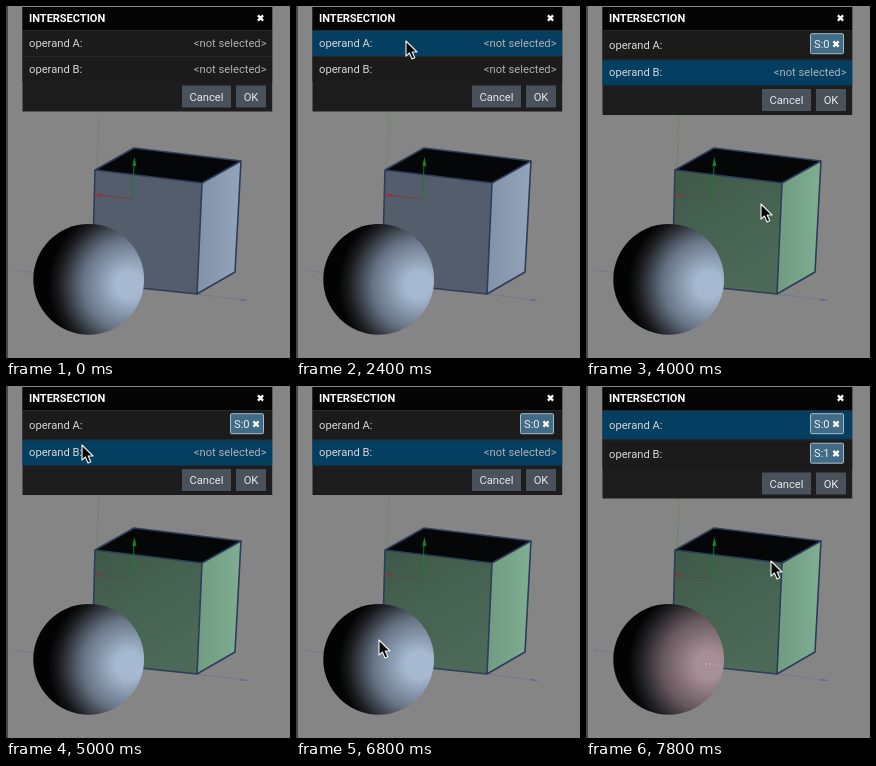
Write an HTML page that moves like this. It is 284 px wide and 352 px high and loops after 8000 ms.

```html
<!DOCTYPE html>
<html lang="en">
<head>
<meta charset="utf-8">
<title>Intersection</title>
<style>
html, body { margin: 0; width: 100%; height: 100%; overflow: hidden; background: #858585; }
svg { display: block; width: 100vw; height: 100vh; }
text { font: 11.2px Roboto, sans-serif; fill: #d6d6d6; }
.title { font-weight: 700; font-size: 11px; fill: #fff; }
.empty { fill: #aeb1b3; text-anchor: end; }
.button rect { fill: #49525b; }
.button text { fill: #e6e8ea; text-anchor: middle; }
.chip rect { fill: #426b86; stroke: #a9bac5; }
.chip text { fill: #e8eef2; }
.row { fill: #1b1b1b; }
.row.active { fill: #043f61; }
.edge { fill: none; stroke: #2d3c5a; stroke-width: 1.6; stroke-linejoin: round; }
</style>
</head>
<body>
<svg viewBox="0 0 284 352">
  <defs>
    <linearGradient id="side" x1="0" y1="0" x2="1" y2="0">
      <stop offset="0" stop-color="#8191a6"/><stop offset="1" stop-color="#93a5bc"/>
    </linearGradient>
    <linearGradient id="sideGreen" x1="0" y1="0" x2="1" y2="0">
      <stop offset="0" stop-color="#709b80"/><stop offset="1" stop-color="#7fae92"/>
    </linearGradient>
    <linearGradient id="frontGreen" x1="0" y1="0" x2=".5" y2="1">
      <stop offset="0" stop-color="#3f5949"/><stop offset="1" stop-color="#4c6a57"/>
    </linearGradient>
    <radialGradient id="ball" gradientUnits="userSpaceOnUse" cx="123" cy="279" r="96">
      <stop class="lit" offset="0"/><stop class="lit" offset=".14"/>
      <stop class="mid" offset=".48"/>
      <stop offset=".73" stop-color="#1b1c1f"/><stop offset=".84" stop-color="#030304"/>
    </radialGradient>
    <path id="cross" d="M-2.6-2.6 2.6 2.6M2.6-2.6-2.6 2.6" stroke="#fff" stroke-width="2.2"/>
  </defs>

  <rect width="284" height="352" fill="#858585"/>
  <path d="M1 0V352" stroke="#383838" stroke-width="1.6"/>

  <path d="M93 109 91 164" stroke="#6b8569" stroke-width=".8"/>
  <path d="M8 264 30 267" stroke="#75758c" stroke-width=".8"/>
  <path d="M191 288 242 294.5" stroke="#74749a" stroke-width=".8"/>
  <path d="M235 292.5 242 294.5 235 295Z" fill="#666692"/>

  <path d="M89 164 128 142 235 155 196 177Z" fill="#050607"/>
  <path id="front" d="M89 164 196 177 191 288 86 277Z"/>
  <path id="right" d="M196 177 235 155 229 266 191 288Z"/>
  <path class="edge" d="M86 277 89 164 128 142 235 155 229 266 191 288 86 277M89 164 196 177 235 155M196 177 191 288"/>

  <path d="M127 193 128 155" stroke="#207a30" stroke-width=".9"/>
  <path d="M126.3 160 128.5 151 130.4 160Z" fill="#14802a"/>
  <path id="redAxis" d="M127 193 88 189" stroke-width=".9"/>
  <path id="redTip" d="M96 187.5 87 188.7 96 191Z"/>

  <circle cx="82.7" cy="273.4" r="55.4" fill="url(#ball)"/>
  <path id="dots" d="M119 278h2m2 0h2m2 1h1m3-1h1m-9 3h1" stroke="#ccc" stroke-width=".8"/>

  <rect id="panel" x="16.5" y="1" width="249.7" fill="#1d1d1d"/>
  <rect x="16.5" y="1" width="249.7" height="23" fill="#050505"/>
  <text class="title" x="23" y="16">INTERSECTION</text>
  <use href="#cross" x="254.5" y="12"/>
  <g id="rows"></g>
  <g id="buttons">
    <g class="button"><rect x="176" width="49" height="22"/><text x="200.5" y="15">Cancel</text></g>
    <g class="button"><rect x="230" width="30" height="22"/><text x="245" y="15">OK</text></g>
  </g>
  <path id="cursor" d="M0 0V15.2L3.4 12 6 18 8.8 16.8 6.2 11H11Z" fill="#050505" stroke="#f4f4f4" stroke-width="1.1" stroke-linejoin="round"/>
</svg>
<script>
const LOOP = 8000, STEP = 200;
const PICK_A = 4000, PICK_B = 7200, FOCUS = 2200;
const $ = id => document.getElementById(id);

// time, x, y of the pointer tip
const path = [
  [1400, 4, 150], [2200, 110, 35], [2400, 110, 35], [3600, 175, 198],
  [4000, 175, 198], [4800, 76, 59], [5000, 76, 59], [6000, 90, 222],
  [6800, 83, 254], [7200, 83, 254], [7800, 185, 175]
];

const rows = ["A", "B"].map((name, i) => {
  const g = document.createElementNS("http://www.w3.org/2000/svg", "g");
  g.innerHTML = `<rect class="row" x="16.5" width="249.7"/>
    <path d="M16.5 .5H266" stroke="#282828"/>
    <text class="label" x="23">operand ${name}:</text>
    <text class="empty" x="260.5">&lt;not selected&gt;</text>
    <g class="chip"><rect x="224.5" y="3.7" width="33" height="20" rx="1"/>
    <text x="228" y="17.8">S:${i}</text><use href="#cross" x="250" y="14"/></g>`;
  $("rows").append(g);
  return g;
});

const show = (el, on) => el.setAttribute("visibility", on ? "visible" : "hidden");
const move = (el, x, y) => el.setAttribute("transform", `translate(${x} ${y})`);
const fill = (el, color) => el.setAttribute("fill", color);

function pointAt(t) {
  const i = path.findIndex(p => p[0] >= t);
  if (i < 1) return path[0].slice(1);
  const [a, b] = [path[i - 1], path[i]];
  const u = (t - a[0]) / (b[0] - a[0]), e = u * u * (3 - 2 * u);
  return [a[1] + (b[1] - a[1]) * e, a[2] + (b[2] - a[2]) * e];
}

function layout(picked, active) {
  let y = 24;
  rows.forEach((g, i) => {
    const h = picked[i] ? 29.5 : 26;
    move(g, 0, y);
    const bar = g.querySelector(".row");
    bar.setAttribute("height", h);
    bar.classList.toggle("active", i === active);
    g.querySelectorAll("text.label, text.empty").forEach(t => t.setAttribute("y", h / 2 + 3.8));
    show(g.querySelector(".empty"), !picked[i]);
    show(g.querySelector(".chip"), picked[i]);
    y += h;
  });
  move($("buttons"), 0, y + 3.5);
  $("panel").setAttribute("height", y + 28.5);
}

function draw(t) {
  const a = t >= PICK_A, b = t >= PICK_B;
  layout([a, b], t < FOCUS ? -1 : a && !b ? 1 : 0);
  fill($("front"), a ? "url(#frontGreen)" : "#535d6b");
  fill($("right"), a ? "url(#sideGreen)" : "url(#side)");
  $("redAxis").setAttribute("stroke-dasharray", a ? "2 1.5" : "none");
  $("redAxis").setAttribute("stroke", a ? "#5f4544" : "#853a42");
  fill($("redTip"), a ? "#753d3f" : "#983039");
  document.querySelectorAll(".lit").forEach(s => s.setAttribute("stop-color", b ? "#a68f96" : "#a6b9d1"));
  document.querySelector(".mid").setAttribute("stop-color", b ? "#68595e" : "#667384");
  show($("dots"), b);
  show($("cursor"), t >= path[0][0]);
  move($("cursor"), ...pointAt(t));
}

const start = performance.now();
function tick() {
  const t = (performance.now() - start) % LOOP;
  draw(Math.floor(t / STEP) * STEP);
  requestAnimationFrame(tick);
}
tick();
</script>
</body>
</html>
```
